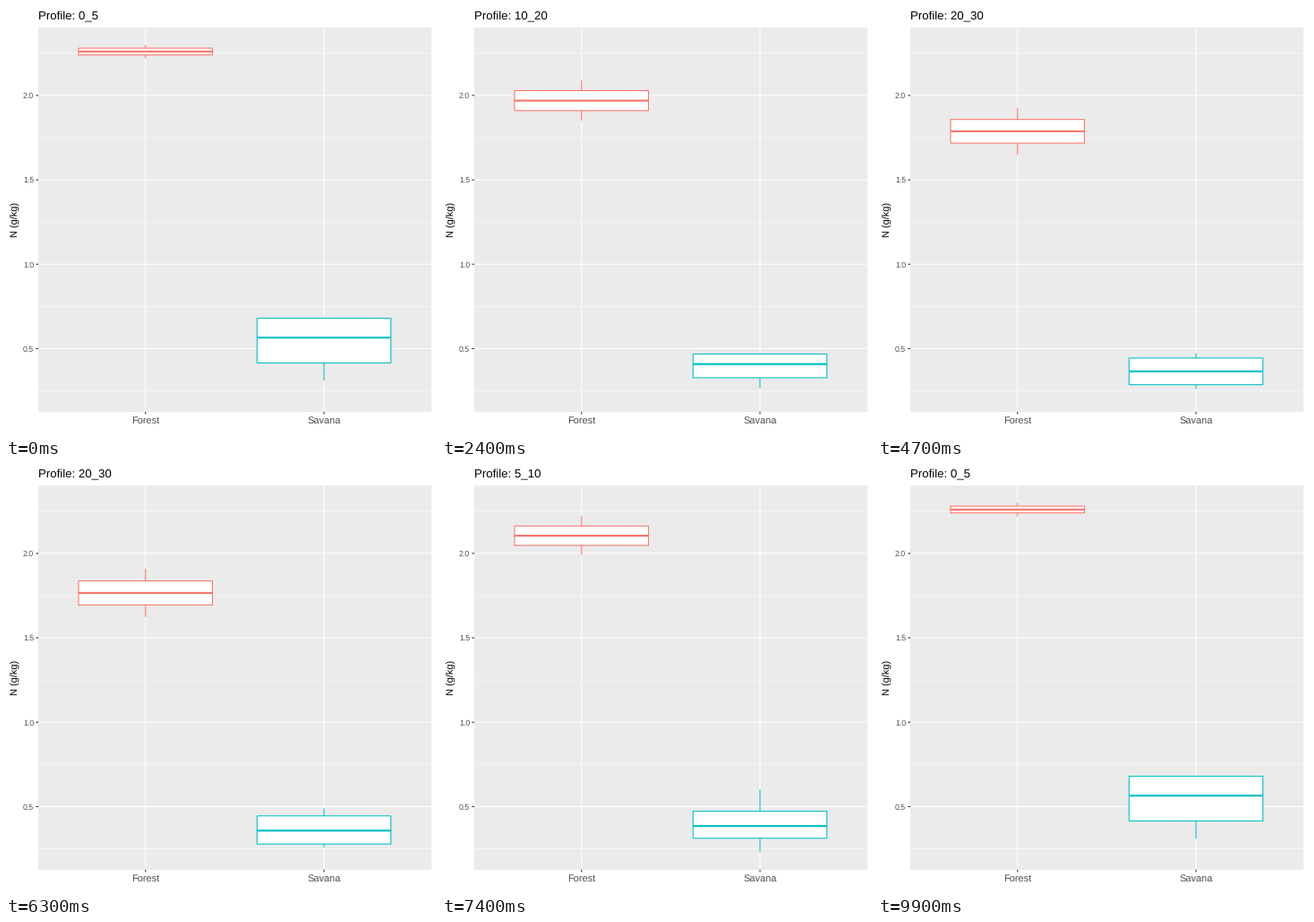
Animation of 480 by 480 pixels, one loop 10000 ms. Source, as a matplotlib script:

```python
import numpy as np
import matplotlib as mpl
import matplotlib.pyplot as plt
from matplotlib.animation import FuncAnimation
from matplotlib.patches import Polygon, Rectangle

mpl.rcParams["font.family"] = "Liberation Sans"
mpl.rcParams["text.hinting"] = "none"

SIZE, FRAMES, INTERVAL = 480, 100, 100
LEFT, RIGHT, TOP, BOTTOM = 36.2, 474.5, 23.8, 452.8
Y_MIN, Y_MAX = 0.1265, 2.4035
LINE = 1.07
GROUPS = [("Forest", "#F8766D"), ("Savana", "#00BFC4")]

# Samples per profile: (Forest, Savana)
SAMPLES = {
    "0_5": ([2.22, 2.30], [0.31, 0.45, 0.68, 0.68]),
    "10_20": ([1.82, 2.07], [0.26, 0.34, 0.45, 0.45]),
    "20_30": ([1.59, 1.88], [0.26, 0.28, 0.43, 0.48]),
    "5_10": ([1.99, 2.22], [0.23, 0.34, 0.43, 0.60]),
}
NAMES = list(SAMPLES)
# Last frame at rest and first frame of the next profile
MOVES = [(12, 25), (38, 50), (62, 74), (87, 99)]

STATS = np.array([[np.percentile(s, [0, 25, 50, 75, 100]) for s in pair]
                  for pair in SAMPLES.values()])


def px(x):
    return LEFT + (x - 0.4) * (RIGHT - LEFT) / 2.2


def py(y):
    return BOTTOM - (y - Y_MIN) * (BOTTOM - TOP) / (Y_MAX - Y_MIN)


fig = plt.figure(figsize=(SIZE / 72, SIZE / 72), dpi=72, facecolor="white")
ax = fig.add_axes([0, 0, 1, 1])
ax.set(xlim=(0, SIZE), ylim=(SIZE, 0))
ax.axis("off")


def line(xs, ys, color, width=LINE, z=2):
    return ax.plot(xs, ys, color=color, lw=width, zorder=z, snap=False,
                   solid_capstyle="butt")[0]


def label(x, y, text, size, color="black", **kw):
    return ax.text(x, y, text, fontsize=size, color=color,
                   **{"va": "baseline", **kw})


class Box:
    def __init__(self, x, color):
        self.x, self.half = px(x), px(0.375) - px(0)
        self.low = line([], [], color, z=3)
        self.high = line([], [], color, z=3)
        self.body = Polygon([[0, 0]] * 4, fc="white", ec=color, lw=LINE,
                            joinstyle="miter", snap=False, zorder=4)
        ax.add_patch(self.body)
        self.mid = line([], [], color, 2 * LINE, z=5)

    def update(self, stats):
        low, q1, mid, q3, high = py(stats)
        a, b = self.x - self.half, self.x + self.half
        self.low.set_data([self.x] * 2, [low, q1])
        self.high.set_data([self.x] * 2, [q3, high])
        self.body.set_xy([[a, q3], [a, q1], [b, q1], [b, q3]])
        self.mid.set_data([a, b], [mid, mid])


ax.add_patch(Rectangle((LEFT, TOP), RIGHT - LEFT, BOTTOM - TOP,
                       fc="#EBEBEB", lw=0, zorder=0, snap=True))
for y in (0.25, 0.75, 1.25, 1.75, 2.25):
    line([LEFT, RIGHT], [py(y)] * 2, "white", LINE / 2, z=1)
for y in (0.5, 1.0, 1.5, 2.0):
    line([LEFT, RIGHT], [py(y)] * 2, "white")
    line([LEFT - 2.75, LEFT], [py(y)] * 2, "#333333")
    label(31.2, py(y) + 3.2, f"{y:.1f}", 8.8, "#4D4D4D", ha="right")

boxes = []
for i, (name, color) in enumerate(GROUPS, 1):
    line([px(i)] * 2, [TOP, BOTTOM], "white")
    line([px(i)] * 2, [BOTTOM, BOTTOM + 2.75], "#333333")
    label(px(i), 466, name, 11, "#4D4D4D", ha="center")
    boxes.append(Box(i, color))

label(13.4, (TOP + BOTTOM) / 2, "N (g/kg)", 11, rotation=90,
      ha="right", va="center", rotation_mode="default").set(
          rotation_mode="anchor", ha="center", va="baseline")
title = label(LEFT, 15, "", 13.2)


def phase(frame):
    """Current profile, next profile and linear progress between them."""
    for i, (leave, arrive) in enumerate(MOVES):
        if frame < arrive:
            t = max(0, frame - leave) / (arrive - leave)
            return i, (i + 1) % len(NAMES), t
    return 0, 1, 0


def draw(frame):
    a, b, t = phase(frame)
    title.set_text("Profile: " + NAMES[b if t > 0.5 else a])
    for box, stats in zip(boxes, STATS[a] + (STATS[b] - STATS[a]) * t):
        box.update(stats)
    return []


anim = FuncAnimation(fig, draw, frames=FRAMES, interval=INTERVAL,
                     init_func=lambda: draw(0), repeat=True, repeat_delay=0)
plt.show()
```
